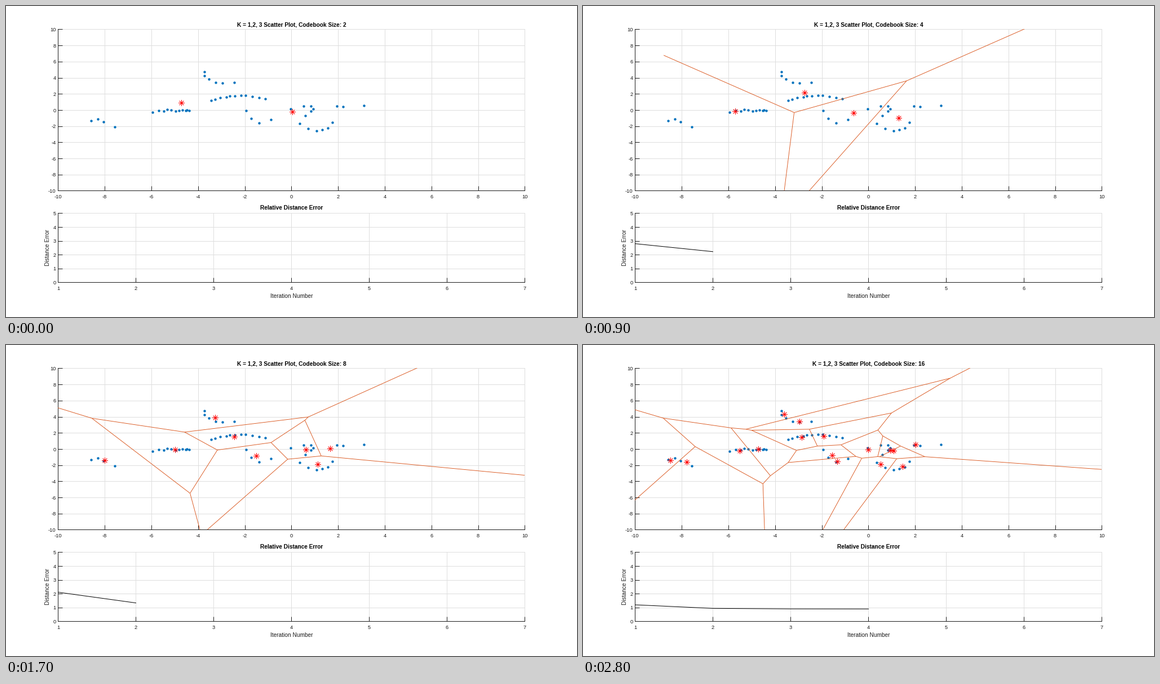
A matplotlib script that plays this animation: 1013 px wide and 553 px high, repeating every 3.3 s.

```python
import numpy as np
import matplotlib.pyplot as plt
from matplotlib.animation import FuncAnimation
from matplotlib.collections import LineCollection

W, H, DPI = 1013, 553, 72  # at 72 dpi one point is one pixel
BLUE, ORANGE, INK, GRID = "#0072bd", "#d95319", "#1c1c1c", "#dedede"
TICKS, INTERVAL = 33, 100
plt.rcParams.update({"font.family": "Liberation Sans",
                     "axes.unicode_minus": False})
rng = np.random.default_rng(4)


def arc(n, start, mid, end):
    """n slightly scattered points on a parabola through three points."""
    a, m, b = map(np.array, (start, mid, end))
    t = np.linspace(0, 1, n)[:, None]
    curve = a + (b - a) * t + 4 * t * (1 - t) * (m - (a + b) / 2)
    return curve + rng.normal(0, (.03, .08), (n, 2))


data = np.vstack([
    arc(4, (-8.56, -1.29), (-8.2, -1.25), (-7.55, -2.09)),
    arc(11, (-5.91, -.28), (-4.95, -.05), (-4.41, .1)),
    arc(6, (-3.73, 4.74), (-3.42, 3.6), (-2.48, 3.38)),
    arc(11, (-3.43, 1.2), (-2.4, 1.75), (-1.15, 1.36)),
    arc(4, (-1.93, -.07), (-1.55, -1.4), (-.95, -1.15)),
    arc(6, (0, 0), (.95, .45), (.56, -.91)),
    arc(3, (1.98, .38), (2.23, .45), (3.15, .70)),
    arc(6, (.37, -1.6), (1.17, -2.6), (1.75, -1.53)),
])

# Finest codebook; neighbours in the list are twins of one split
sixteen = np.array([
    (-8.478, -1.365), (-7.778, -1.638), (-5.519, -.215), (-4.71, .015),
    (-3.611, 4.345), (-2.947, 3.425), (-2.85, 1.45), (-1.907, 1.605),
    (-1.546, -.733), (-1.329, -1.56), (0, -.045), (.942, -.125),
    (1.075, -.215), (2.017, .53), (.531, -1.91), (1.461, -2.15)])
sixteen_start = sixteen.copy()
sixteen_start[6:8] = (-2.971, 1.488), (-1.799, 1.54)
sixteen_start[14:] = (.918, -1.75), (1.341, -2.36)

# Each parent is the weighted mean of its twins
share = np.array([.5, .38, .5, .56, .75, .33, .5, .33])[:, None]
eight = share * sixteen[::2] + (1 - share) * sixteen[1::2]
eight_start = np.array([
    (-7.693, -1.255), (-4.891, -.035), (-3.285, 3.85), (-2.5, 1.577),
    (-1.546, -.54), (.616, -.04), (1.908, -.095), (1.051, -1.36)])

four = np.array([(-5.845, -.455), (-2.79, 2.423),
                 (-.725, -.364), (1.341, -.947)])
four_start = np.array([(-5.422, .54), (-2.621, 1.651),
                       (-.459, -.413), (1.147, -1.022)])

two = np.array([(-4.15, .85), (.50, -.55)])
two_start = np.array([(-4.722, .906), (.036, -.244)])

# First tick, iterations, codebook before and after, error limit and excess
STAGES = [
    (0, 4, two_start, two, 2.82, .90),
    (8, 4, four_start, four, 2.13, .67),
    (16, 5, eight_start, eight, 1.21, .90),
    (25, 4, sixteen_start, sixteen, .90, .30),
]


def voronoi_edges(pts, cap=99):
    """Clip every pairwise bisector against all other points.

    cap limits the height of the open ray at the upper left.
    """
    edges = []
    if len(pts) < 3:
        return edges
    for i, p in enumerate(pts):
        for j in range(i + 1, len(pts)):
            q = pts[j]
            mid = (p + q) / 2
            d = np.array([p[1] - q[1], q[0] - p[0]])
            d = d / np.hypot(*d) * (1 if d[1] >= 0 else -1)
            lo, hi = -90.0, 90.0
            for k, r in enumerate(pts):
                if k in (i, j):
                    continue
                s = 2 * d @ (p - r)
                c = p @ p - r @ r - 2 * mid @ (p - r)
                if s > 0:
                    lo = max(lo, c / s)
                elif s < 0:
                    hi = min(hi, c / s)
                elif c > 0:
                    hi = lo
            if mid[0] < -4 and d[1] > 0:
                hi = min(hi, (cap - mid[1]) / d[1])
            if lo < hi:
                edges.append([mid + lo * d, mid + hi * d])
    return edges


def make_axes(top, bottom, xticks, yticks):
    left, right = 92.4, 920.4
    ax = fig.add_axes([left / W, 1 - bottom / H,
                       (right - left) / W, (bottom - top) / H])
    ax.set(xlim=(xticks[0], xticks[-1]), ylim=(yticks[0], yticks[-1]),
           xticks=xticks, yticks=yticks, facecolor="none", axisbelow=True)
    ax.grid(color=GRID, lw=1, clip_on=False)
    ax.spines[["top", "right"]].set_visible(False)
    ax.spines[["left", "bottom"]].set(color=INK, linewidth=1)
    ax.tick_params(direction="in", length=8, width=1, color=INK,
                   labelcolor=INK, labelsize=9.3)
    ax.tick_params(axis="x", pad=6)
    ax.tick_params(axis="y", pad=4)
    return ax


def label(x, y, text, **kw):
    style = dict(ha="center", va="baseline", size=10.15, color=INK)
    return fig.text(x / W, 1 - y / H, text, **{**style, **kw})


fig = plt.figure(figsize=((W + .01) / DPI, (H + .01) / DPI), dpi=DPI,
                 facecolor="white")
even = range(-10, 11, 2)
plot = make_axes(41.5, 328.5, even, even)
error = make_axes(368.5, 491.5, range(1, 8), range(6))

bold = dict(weight="bold", color="black")
title = label(506.5, 36, "", **bold)
label(506.5, 362, "Relative Distance Error", **bold)
label(506.5, 519, "Iteration Number")
label(74, 430, "Distance Error", rotation=90, va="center")

plot.plot(*data.T, "o", color=BLUE, ms=4.4, mew=0, zorder=3)
cells = plot.add_collection(
    LineCollection([], colors=ORANGE, linewidths=.9, zorder=4), autolim=False)
stars, = plot.plot([], [], ls="", marker=(8, 2, 0), ms=10.5, mew=.75,
                   color="red", zorder=5)
curve, = error.plot([], [], color="black", lw=1, zorder=3)


def draw(tick):
    start, count, first, last, limit, excess = [
        s for s in STAGES if s[0] <= tick][-1]
    step = min(tick - start, count - 1)
    # refinement converges geometrically
    f = 1 if step == count - 1 else 1 - .3 ** step
    pts = first + (last - first) * f
    cap = 7.1 - .45 * f if len(pts) == 4 else 99

    title.set_text(f"K = 1,2, 3 Scatter Plot, Codebook Size: {len(pts)}")
    stars.set_data(*pts.T)
    cells.set_segments(voronoi_edges(pts, cap))
    k = np.arange(step + 1)
    curve.set_data(k + 1, limit + excess * .14 ** k)
    return title, stars, cells, curve


anim = FuncAnimation(fig, draw, frames=TICKS, interval=INTERVAL,
                     repeat=True, repeat_delay=0, blit=False)
plt.show()
```
